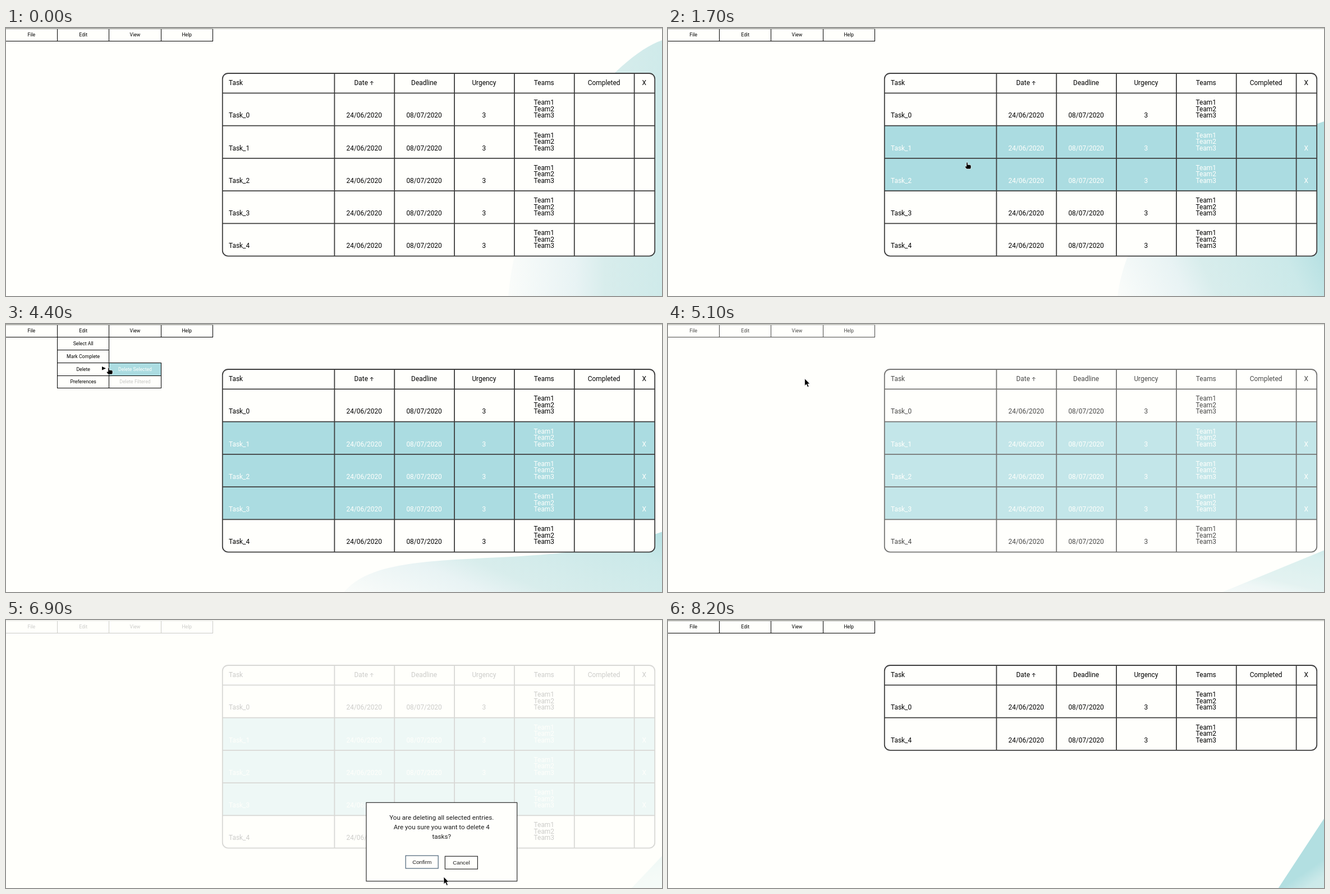
An HTML page that plays this animation: 1169 px wide and 479 px high, repeating every 8300 ms.

```html
<!DOCTYPE html>
<html lang="en">
<head>
<meta charset="utf-8">
<title>Task table</title>
<style>
  html, body { margin: 0; width: 100%; height: 100%; overflow: hidden; background: #fffffc; }
  svg { display: block; width: 1169px; height: 479px; font-family: Roboto, sans-serif; }
  text { white-space: pre; }
  .mid { text-anchor: middle; }
  .cell rect { fill: #fffffc; stroke: #000; shape-rendering: crispEdges; }
  .cell text { font-size: 8.7px; }
  .cell.off text { fill: #c8c8c6; }
  .cell.on rect { fill: #abdce1; }
  .cell.on text { fill: #fffffc; }
  #table text { font-size: 11.9px; }
  #table path, #frame { fill: none; stroke: #3e3e3e; stroke-width: 1.8; }
  .row rect { fill: none; }
  .row .del { visibility: hidden; }
  .row.on rect { fill: #abdce1; }
  .row.on text { fill: #fffffc; visibility: visible; }
  #dialog text { font-size: 11.65px; fill: #1c1c1c; }
  #dialog rect { fill: #fffffc; stroke: #2b2b2b; stroke-width: 1.2; }
  #dialog .btn text { font: 9.75px "Liberation Sans", Arial, sans-serif; }
</style>
</head>
<body>
<svg viewBox="0 0 1169 479">
  <defs>
    <linearGradient id="tint" gradientUnits="userSpaceOnUse">
      <stop offset="0" stop-color="#fafcfa"/>
      <stop offset=".3" stop-color="#e8f3f4"/>
      <stop offset=".43" stop-color="#d8edec"/>
      <stop offset=".8" stop-color="#cbe9e9"/>
      <stop offset="1" stop-color="#b2dfe1"/>
    </linearGradient>
  </defs>
  <path id="blob" fill="url(#tint)"/>
  <g id="table">
    <rect id="back" x="385.8" y="81" width="770.4" rx="10" fill="#fffffc"/>
    <g id="rows"></g>
    <g id="heads"></g>
    <path id="cols"/>
    <rect id="frame" x="385.8" y="81" width="770.4" rx="10"/>
  </g>
  <g id="menu"></g>
  <g id="drop"></g>
  <g id="sub"></g>
  <path d="M0 1H1169" stroke="#bfc0bb" stroke-width="1.6"/>
  <rect id="veil" width="1169" height="479" fill="#fffffc"/>
  <g id="dialog"><rect x="642" y="326.3" width="268.7" height="140.5"/></g>
  <g id="cursor">
    <path id="arrow" d="M0 0V13.2L3 10.4 5.2 15.4 7.5 14.4 5.3 9.6H9.3Z" fill="#000" stroke="#fff" stroke-width=".8" stroke-linejoin="round"/>
    <path id="hand" d="M-2.2 .6Q-1 -.8 .2 .6V4.2L4 4.6Q6 5 6 6.6V9.6L5 12H-2L-4.6 8.4Q-4.8 6.4 -2.2 7.2Z" fill="#000" stroke="#fff" stroke-width=".7" stroke-linejoin="round"/>
  </g>
</svg>
<script>
const LOOP = 8300, STEP = 100;
const HEAD = 116.4, ROW = 58.25;   // bottom of the header, row pitch
const COL = 585.4, PITCH = 106.85; // first divider, column pitch
const CELL = 92.33, ITEM = 22.7;   // menu cell size
const $ = id => document.getElementById(id);

function add(parent, tag, attrs, label) {
  const el = document.createElementNS('http://www.w3.org/2000/svg', tag);
  set(el, attrs);
  if (label) el.textContent = label;
  return parent.appendChild(el);
}
function set(el, attrs) { for (const k in attrs) el.setAttribute(k, attrs[k]); }
const centred = (g, x, y, s) => add(g, 'text', { x, y, class: 'mid' }, s);
const show = (el, on) => { el.style.display = on ? '' : 'none'; };
const mix = (a, b, f) => a + (b - a) * f;
const ramp = (t, a, b) => Math.min(1, Math.max(0, (t - a) / (b - a)));
const easeOut = u => 1 - (1 - u) ** 2;

// Menus
function cell(parent, col, line, label, off) {
  const g = add(parent, 'g', { class: off ? 'cell off' : 'cell' });
  const x = 91.5 + CELL * (col - 1), y = 1.2 + ITEM * line;
  add(g, 'rect', { x, y, width: CELL, height: ITEM });
  centred(g, x + CELL / 2, y + ITEM / 2 + 2.9, label);
  return { g, x, y, parent, off };
}
const cells = [
  ...['File', 'Edit', 'View', 'Help'].map((s, i) => cell($('menu'), i, 0, s)),
  ...['Select All', 'Mark Complete', 'Delete', 'Preferences'].map((s, i) => cell($('drop'), 1, i + 1, s)),
  cell($('sub'), 2, 3, 'Delete Selected'),
  cell($('sub'), 2, 4, 'Delete Filtered', true)
];
add($('drop'), 'path', { d: 'M171 76L178 79.3 171 82.6Z' });

// Table
const mid = i => COL + PITCH * (i + .5) - .6;
const DEL = 1137.3;
const heads = $('heads');
add(heads, 'text', { x: 397, y: 102.2 }, 'Task');
add(heads, 'text', { x: 620.5, y: 102.2 }, 'Date');
add(heads, 'path', { d: 'M651.8 101.8V95.4M649 98L651.8 95.2 654.6 98', style: 'stroke:#000;stroke-width:1' });
['Deadline', 'Urgency', 'Teams', 'Completed'].forEach((s, i) => centred(heads, mid(i + 1), 102.2, s));
centred(heads, DEL, 102.2, 'X');

const rows = [0, 1, 2, 3, 4].map(i => {
  const g = add($('rows'), 'g', { class: 'row' });
  add(g, 'rect', { x: 386, y: 0, width: 770, height: ROW });
  add(g, 'path', { d: 'M386 0H1156' });
  add(g, 'text', { x: 397, y: 43.9 }, 'Task_' + i);
  ['24/06/2020', '08/07/2020', '3'].forEach((s, k) => centred(g, mid(k), 43.9, s));
  for (let k = 1; k < 4; k++) centred(g, mid(3), 9.7 + 11.4 * k, 'Team' + k);
  centred(g, DEL, 43.9, 'X').classList.add('del');
  return g;
});

// Dialog
const dialog = $('dialog');
['You are deleting all selected entries.', 'Are you sure you want to delete 4', 'tasks?']
  .forEach((s, i) => centred(dialog, 776.2, 356.7 + 17 * i, s));
function button(x, label) {
  const g = add(dialog, 'g', { class: 'btn' });
  add(g, 'rect', { x, y: 422.3, width: 58, height: 22.8 });
  centred(g, x + 29, 437.4, label);
  return g;
}
const confirmBtn = button(712.2, 'Confirm');
button(782.4, 'Cancel');

// Stops of the pointer: time, x, y
const STOPS = [
  [400, 284, 3], [1200, 518, 190], [1700, 534, 240], [2000, 538, 304],
  [2900, 133, 39], [3000, 132, 20], [4400, 184, 78], [4900, 228, 81],
  [5400, 267, 122], [5800, 736, 431], [6700, 741, 433], [7300, 858, 511]
];
const OPEN = 3000, NEST = 4200, ASK = 5000, CONFIRM = 6950, REMOVED = 7100, LEAVE = 7300;

function pointer(t) {
  const i = Math.max(1, STOPS.findIndex(s => s[0] > t));
  const [a, ax, ay] = STOPS[i - 1], [b, bx, by] = STOPS[i];
  const f = ramp(t, a, b);
  return [mix(ax, bx, f), mix(ay, by, f)];
}

// A wide hump slides left and sinks, then turns into a steepening slope.
function drawBlob(s) {
  const flat = ramp(s, 4.4, 5), q = (s / 4.4) ** 2;
  const end = 22 + 79.7 * s + 5.4 * s ** 2 - 1.24 * s ** 3;
  const slope = Math.max(.15, .52 + .36 * (s - 5.4));
  const hump = 895 - 48 * s - 4.2 * s * s;
  const x = mix(hump, 1169 - (479 - end) / slope, flat);
  const third = f => [mix(x, 1169, f), mix(479, end, f)];
  const bend = (p, f) => third(f).map((v, i) => mix(p[i], v, flat));
  const c1 = bend([hump + 20 + 57 * q, 250 + 135 * q], 1 / 3);
  const c2 = bend([1080 - 30 * s, end + 30 + 11 * s], 2 / 3);
  $('blob').setAttribute('d', `M${x} 479C${c1} ${c2} 1169 ${end}V479Z`);

  const turn = -.265 * s, reach = (400 - 15 * s) * (1 - .55 * flat);
  const x1 = mix(hump, 1210, flat), y1 = mix(479, 550, flat);
  set($('tint'), { x1, y1, x2: x1 + reach * Math.cos(turn), y2: y1 + reach * Math.sin(turn) });
}

const picked = [Infinity, 1200, 1700, 2000, Infinity];
function drawTable(t, x, y, live) {
  const gone = t >= REMOVED;
  const height = HEAD + ROW * (gone ? 2 : 5) - 81;
  let hot = false;
  rows.forEach((g, i) => {
    const top = HEAD + ROW * (gone && i === 4 ? 1 : i);
    const over = live && x > 386 && x < 1156 && y >= top && y < top + ROW;
    hot = hot || over;
    show(g, !gone || i % 4 === 0);
    g.setAttribute('transform', `translate(0 ${top})`);
    g.classList.toggle('on', over || t >= picked[i]);
  });
  set($('back'), { height });
  set($('frame'), { height });
  $('cols').setAttribute('d', rows.concat(0).map((_, i) => `M${COL + PITCH * i} 81v${height}`).join(''));
  return hot;
}

function drawMenu(t, x, y, live) {
  const open = { menu: true, drop: t >= OPEN && t < ASK, sub: t >= NEST && t < ASK };
  show($('drop'), open.drop);
  show($('sub'), open.sub);
  let hot = false;
  for (const c of cells) {
    const over = live && open[c.parent.id] && !c.off &&
      x >= c.x && x < c.x + CELL && y >= c.y && y < c.y + ITEM;
    c.g.classList.toggle('on', over);
    hot = hot || over;
  }
  return hot;
}

function drawDialog(t) {
  const leave = 1 - ramp(t, CONFIRM, CONFIRM + 400);
  const lift = 2 * (easeOut(ramp(t, 5800, 6100)) - easeOut(ramp(t, 6800, 7200)));
  $('veil').setAttribute('opacity', .8 * easeOut(ramp(t, ASK, ASK + 500)) * leave);
  dialog.setAttribute('opacity', easeOut(ramp(t, ASK + 100, ASK + 900)) * leave);
  confirmBtn.setAttribute('transform', `translate(0 ${-lift})`);
  confirmBtn.firstChild.style.stroke = lift ? '#4c6478' : '';
}

function draw(time) {
  const t = Math.floor(time % LOOP / STEP) * STEP;
  const [x, y] = pointer(t);
  const seen = t >= STOPS[0][0] && t < LEAVE, live = seen && t < ASK;
  drawBlob(t / 1000);
  drawDialog(t);
  const onRow = drawTable(t, x, y, live);
  const onMenu = drawMenu(t, x, y, live);
  const onButton = t >= 5800 && x > 712 && x < 770 && y > 420 && y < 445;
  const hand = onRow || onMenu || onButton;
  show($('cursor'), seen);
  $('cursor').setAttribute('transform', `translate(${x} ${y})`);
  show($('hand'), hand);
  show($('arrow'), !hand);
}

const start = performance.now();
function tick() {
  draw(performance.now() - start);
  requestAnimationFrame(tick);
}
tick();
</script>
</body>
</html>
```
